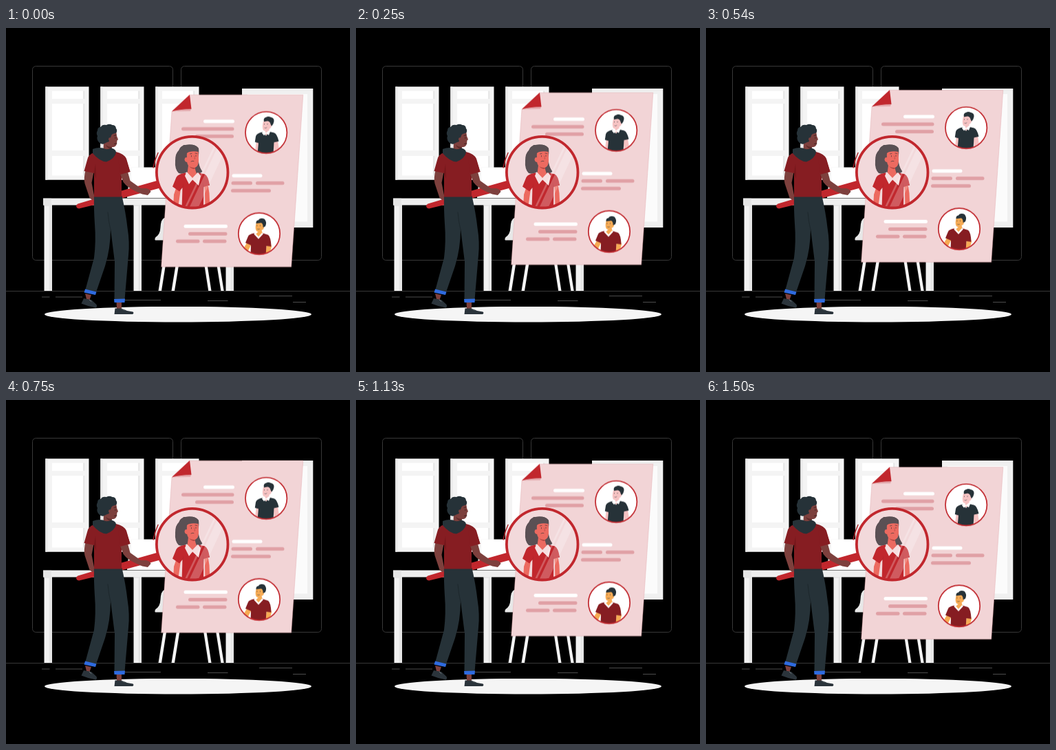
An HTML page that plays this animation: 500x500 px, repeating every 1.54 s.

```html
<!DOCTYPE html>
<html lang="en">
<head>
<meta charset="utf-8">
<title>Choosing a candidate</title>
<style>
  html, body { margin: 0; width: 100%; height: 100%; overflow: hidden; background: #000; }
  svg { display: block; width: 100vw; height: 100vh; }
  .outline { fill: none; stroke: #383838; stroke-width: 1; }
  .dash { stroke: #4c4c4c; stroke-width: 1; }
  .dark { fill: #263238; }
  .red { fill: #c1272d; }
  .maroon { fill: #861d22; }
  .brown { fill: #7d403d; }
  .blue { fill: #2f6bdf; }
  .skin { fill: #ec6a60; }
  .pale { fill: #f6c3c3; }
  .amber { fill: #f6ab55; }
  .hair { fill: #5a5054; }
  .bar { stroke-width: 5; stroke-linecap: round; }
  .thin { fill: none; stroke-linecap: round; stroke-linejoin: round; }
</style>
</head>
<body>
<svg viewBox="0 0 500 500">
  <defs>
    <clipPath id="lens"><circle cx="270.7" cy="209.7" r="51"/></clipPath>
    <clipPath id="c1"><circle cx="378.2" cy="152.2" r="30"/></clipPath>
    <clipPath id="c2"><circle cx="368" cy="299.3" r="30"/></clipPath>
    <g id="window">
      <path fill="#f4f4f4" d="M57.300 85.300h63.200v135.400h-63.200z"/>
      <path fill="#e8e8e8" d="M57.300 85.300h3v135.400h-3zM112 91.500h2.500v11.500h-2.500zM112 110h2.500v68h-2.500zM112 186h2.500v28.500h-2.500z"/>
      <path fill="#fff" d="M67 91.500h45v11.500h-45zM67 110h45v68h-45zM67 186h45v28.500h-45z"/>
    </g>
    <g id="deskleg">
      <path fill="#f2f2f2" d="M55.500 257h11.500v125h-11.500z"/>
      <path fill="#e0e0e0" d="M55.500 257h11.500v2h-11.500zM62.500 259h4.500v123h-4.500z" opacity=".6"/>
    </g>
  </defs>

  <rect width="500" height="500"/>
  <g class="outline">
    <rect x="38.500" y="55.500" width="204" height="282" rx="5"/>
    <rect x="254.500" y="55.500" width="204" height="282" rx="5"/>
    <path d="M0 382.500H500"/>
  </g>
  <path class="dash" d="M52 391h11.500M72 391h39M168 395.500h57M293 396.500h29.500M368 389.500h48M417 398.500h19"/>
  <ellipse cx="250" cy="416.200" rx="194" ry="11.300" fill="#f5f5f5"/>
  <use href="#window"/>
  <use href="#window" x="80"/>
  <use href="#window" x="160"/>

  <!-- wall board -->
  <path fill="#f0f0f0" d="M343 88h103.300v202h-103.300z"/>
  <path fill="#fbfbfb" d="M351 96h87v185.500h-87z"/>

  <!-- desk -->
  <path fill="#f5f5f5" d="M176 244.500L181 203.500Q181.500 202.500 183 202.500H236V247H176Z"/>
  <path fill="#fff" d="M182 203h54v42h-54z"/>
  <path class="thin" stroke="#a82227" stroke-width="1.400" d="M221 181.500L216 194M217.500 190L214 203"/>
  <path fill="#eee" d="M54 247.500H331V257.500H54Z"/>
  <path fill="#dedede" d="M54 247.500H66V257.500H54Z" opacity=".5"/>
  <use href="#deskleg"/>
  <use href="#deskleg" x="130"/>
  <use href="#deskleg" x="264"/>
  <path fill="#e8e8e8" d="M240 276H230Q225 278 224.500 290Q224 300 217.500 304Q215.500 307 217 308.500H240Z"/>

  <!-- easel legs -->
  <path fill="#f5f5f5" d="M228.800 336h4.500L226 382h-4.500zM248 336h4.500L245 382h-4.500zM287 336h4.300L298.500 382h-4.300zM305 336h4.300L316.700 382h-4.300z"/>

  <g id="poster">
    <path fill="#f2d4d6" stroke="#dfa3a8" stroke-width=".4" d="M267 97.500H431.800L414.700 347.600H225.700L241 121.500Z"/>
    <path fill="#e3a9ad" d="M241 121.500L268 121L269.500 117Z"/>
    <path class="red" d="M267 97.200L241 121.500Q255 118 269.500 118Z"/>
    <g id="bars"></g>

    <circle cx="378.200" cy="152.200" r="30" fill="#fff"/>
    <g clip-path="url(#c1)">
      <path class="pale" d="M364 164L361.500 183H369L370 164ZM388 164L390 183H398L395 164Z"/>
      <path class="pale" d="M374 136Q372 143 373.500 148Q375 150.500 377 149.500L376 154L379 157L383 152L382.500 147Q387 146 386 138L382 133Z"/>
      <path class="dark" d="M373 151.500Q364 153 363 158L361.800 166L367 167.500L365.500 184H388.500L389.500 166.500L396.500 165Q394 154 389.500 152.500L383 151L378 157Z"/>
      <path fill="#fff" d="M374 149.500L372 153L375 156.500L378 153.500L382 156L384 151L382.500 149L378 152.500Z"/>
      <path class="dark" d="M375 136.500Q373.500 131 378 130Q381 128 385 130Q390 131 389.500 136Q389 140 386 143L384.500 140Q384 136 380 135.500Z"/>
      <path class="thin" stroke="#263238" stroke-width=".5" d="M375.500 139.500v1M380 139.500v1M376 145.500Q377.500 146.500 379 145"/>
    </g>
    <circle cx="378.200" cy="152.200" r="30.200" fill="none" stroke="#c1272d" stroke-width="1.700"/>

    <circle cx="368" cy="299.300" r="30" fill="#fff"/>
    <g clip-path="url(#c2)">
      <path class="amber" d="M351 311L345 321L350 328L357 314ZM379 311L378 323L372 329H383L386 318L384 310Z"/>
      <path class="amber" d="M364 283Q361.500 290 363.500 294.500Q365 297 367 296L363 300L367 306L373 299.500L371.500 294Q376 293 375 286L370 281Z"/>
      <path class="maroon" d="M361 298.500Q353 300 352 303L348 312.500L356 316L355.500 331H377.500L378.500 317L385.500 318Q385 304 381 301L373 298.500L367 306Z"/>
      <path fill="#fff" d="M361.500 297.500L360.500 300L367 307L374 299.500L372 298L367 303.500Z"/>
      <path class="dark" d="M363.500 284.500Q363 280 367 279.500Q368 276.500 372 277Q376 277 377 280Q379.500 284 376.500 289L373.500 290Q374 285 371 283.500Q367 284 363.500 284.500Z"/>
      <path class="thin" stroke="#263238" stroke-width=".5" d="M365 287v1M369.500 287v1M365.500 292.500Q367 293.500 368.500 292.500"/>
    </g>
    <circle cx="368" cy="299.300" r="30.200" fill="none" stroke="#c1272d" stroke-width="1.700"/>
  </g>

  <!-- magnifier -->
  <path class="red" d="M104.500 255.500L168 236.500L221 221.500L224 232.500L170 247L106 262.500Q102.500 262 102 259Q102 256.500 104.500 255.500Z"/>
  <circle cx="270.700" cy="209.700" r="52" fill="#f2d9db"/>
  <g clip-path="url(#lens)">
    <path class="hair" d="M251 178Q253 170 264 169.500Q275 168.500 280 175Q281 181 279 190Q279 200 285 208Q284 211 280 211L262 210Q256 213 251 211Q245 205 246 193Q246 182 251 178Z"/>
    <path class="skin" d="M248 230L244 242L243 262H250L254 234ZM288 226L289 240L289.500 262H296.500L295.500 240L293 224Z"/>
    <path class="skin" d="M263 182Q261.500 195 265 200L263.500 211L270 220L277 212L274.500 203Q280.500 202 280 192L279.500 179Q270 175 263 182Z"/>
    <path fill="#b84843" d="M266 201Q270 203.500 274.500 203V205Q270 205.500 266 201Z"/>
    <path class="red" d="M261 210.500Q250 212 247.500 217L242 230.500L252 237.500L256.500 232L255.500 263H287L287.500 231L296 228.500Q294 215 289 212.500L278 210L270 222Z"/>
    <path fill="#9c1f26" d="M256.500 231L258 225L257 240ZM287.500 231L286 224L286 240ZM270 222L277 229L284 222L280 232Z" opacity=".4"/>
    <path fill="#f7dedf" d="M262.500 209L260 215L266 227L271 220.500L280 229L283 215L279 209.500L271 218Z"/>
    <path class="hair" d="M262 182Q268 178 280 180Q281 172 273 170H258L250 180L249 200L256 210Q262 205 262 196Q259 194 260 190Q261.500 188 263 190Z"/>
    <path class="hair" d="M275.500 203Q280 200 279.800 194Q281 203 285.500 209Q281 212 276 209Z"/>
    <path class="skin" d="M263.500 188.500Q260 187 259.500 191Q260 195.500 264 195Z"/>
    <path class="thin" stroke="#46383c" stroke-width=".7" d="M267.500 183L270 182.500M275 182L277.500 182.500M269.500 185.500v1.500M276 185v1.500M269 194Q271 192.800 273 193.500"/>
    <path class="thin" stroke="#b84843" stroke-width=".6" d="M273.500 186L275 190H273.500"/>
    <path fill="#fff" opacity=".24" d="M309 170H322L279 262H266ZM303 170H306L262 262H259Z"/>
  </g>
  <circle cx="270.700" cy="209.700" r="51.800" fill="none" stroke="#c1272d" stroke-width="3.800"/>

  <!-- man -->
  <path class="brown" d="M116 205Q112.500 218 114.500 226L121.500 247L126 250.500L129 248L124.500 225L128 207Z"/>
  <path class="brown" d="M115 386L124 388L121.500 395L117 394ZM160.500 398H168V408H161Z"/>
  <path class="dark" d="M128 244H168.500Q174 268 176.500 290Q180 312 178 330L172.500 395H157.500L158 340L152 292Q152 320 144 346L131 384L115.500 380L128 334Q131 310 129 285Q127.500 262 128 244Z"/>
  <path class="thin" stroke="#1b2529" stroke-width=".8" d="M148 268Q149 282 152 293"/>
  <path class="blue" d="M115 379.500L131.500 383.500L130 388L113.500 384.500ZM157 394L173 393.500L172.500 399H157.500Z"/>
  <path fill="#2b343b" d="M113 393L124 395L131.500 402Q133 405 130.500 406.500Q120 405 109.500 400.500ZM158.500 407.500H168L176 411L184.500 412.500Q186.500 414.500 184 416H157.500Z"/>
  <path class="thin" stroke="#b9bfc2" stroke-width=".5" d="M121 395l3 2.500M168 408l4 2"/>
  <path class="maroon" d="M128 181Q119 184 118 192L113.500 208L128 211L128 245.500H168V211L180.500 209L175 190Q172 183 160 180Z"/>
  <path fill="#681317" d="M128 211L130 198L131 219ZM168 211L166 199L166 220Z" opacity=".6"/>
  <path class="brown" d="M165.500 211L177 209L180.500 222L196 233L204 233Q210 234.500 210.500 238L206 243L198 241.500L191 238.500Q176 232 170.500 224Z"/>
  <path class="maroon" d="M163 190L174 189L180.500 209L166 213Z"/>
  <path class="brown" d="M142 162L141.500 178Q148 183 154 177L153 173Q160 174 161 168L161.500 163.500L163 162L161 157L160 149H149Z"/>
  <path fill="#5d2b2a" d="M145 170Q149 173.500 154 173L153.500 176Q147 175 145 170Z"/>
  <path class="dark" d="M126 176Q133 173 141 174.500Q146 178 153 174.500Q160 176 160 181Q158 190 146 194.500Q136 194 126 182Z"/>
  <path class="dark" d="M135 166Q131 162 133 157Q130.500 153 133 149Q133 144 137.500 144Q140 139.500 146 141Q150 138.500 154.500 141Q159.500 141 160 146Q162.500 149 160 152.500L155 154Q153 155 152.500 158L151 161Q151.500 165 147 166L142 168.500Q138 169.500 135 166Z"/>
  <path class="brown" d="M152.500 160Q149.500 158 149 161.500Q149.500 165 152.500 165Z"/>
  <path class="thin" stroke="#2a1718" stroke-width=".7" d="M157 156.500L160 155.500M158.800 159v1.500M157.500 168.500L161 168"/>
</svg>
<script>
  const WHITE = '#fff', PINK = '#e0a0a5';
  // left, right, middle height, colour
  const bars = [
    [287, 332, 136, WHITE], [255, 331.5, 147, PINK], [275, 331, 157.7, PINK],
    [328.5, 372.5, 215, WHITE], [327.5, 358, 225.8, PINK], [363, 404.5, 225.8, PINK], [327, 385, 236.8, PINK],
    [258.5, 322, 288.6, WHITE], [265, 321.5, 299.4, PINK], [247, 281.5, 310.2, PINK], [286, 320.5, 310.2, PINK]
  ];
  document.getElementById('bars').innerHTML = bars.map(([l, r, y, c]) =>
    `<path class="bar" stroke="${c}" d="M${l + 2.5} ${y}H${r - 2.5}"/>`).join('');

  // The poster floats up and down at constant speed.
  const LOOP = 1540;
  const steps = [[0, -0.3], [730, -9.6], [1500, 0.2], [LOOP, -0.3]];
  document.getElementById('poster').animate(
    steps.map(([t, y]) => ({ offset: t / LOOP, transform: `translateY(${y}px)` })),
    { duration: LOOP, iterations: Infinity, easing: 'linear' });
</script>
</body>
</html>
```
